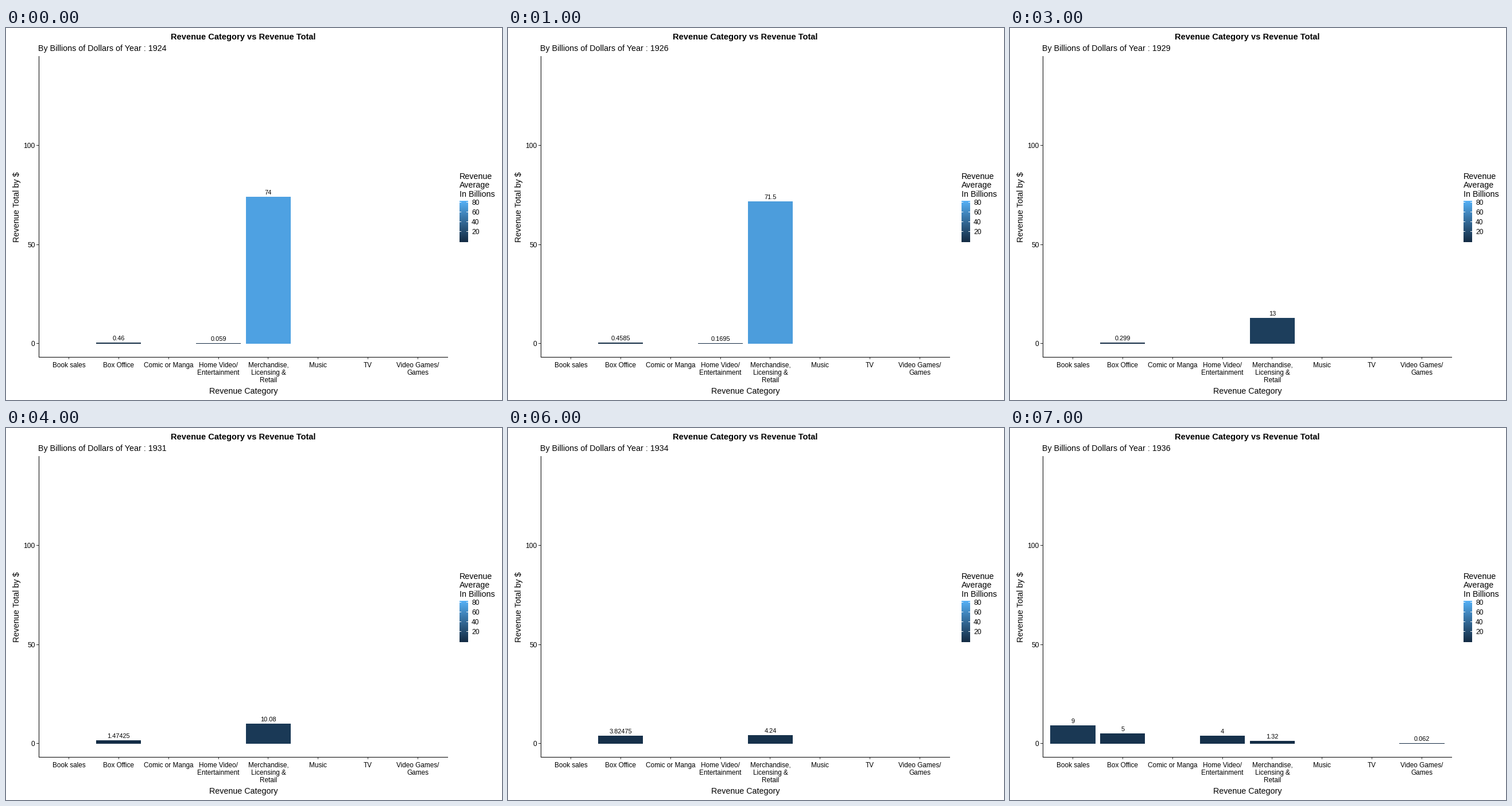
A matplotlib script for the animation above (8 s loop, 864x648 px).

```python
import numpy as np
import matplotlib.pyplot as plt
from matplotlib.animation import FuncAnimation
from matplotlib.patches import Rectangle

W, H, DPI = 864, 648, 100
FRAMES, INTERVAL = 8, 1000
LEFT, RIGHT, TOP, AXIS_Y = 57, 770, 49, 573
ZERO_Y, UNIT, BASE = 549.45, 3.455, 550
FIRST_X, STEP, BAR_W = 109.5, 86.87, 78.2
MAX_VALUE = 83

CATEGORIES = ["Book sales", "Box Office", "Comic or Manga",
              "Home Video/\nEntertainment", "Merchandise,\nLicensing &\nRetail",
              "Music", "TV", "Video Games/\nGames"]

# category index -> runs of (frames, values), linear between the keys
SERIES = {
    0: [([7], [9])],
    1: [([0, 2, 3, 7], [0.46, 0.457, 0.299, 5])],
    3: [([0, 2], [0.059, 0.28]), ([7], [4])],
    4: [([0, 2, 3, 7], [74, 69, 13, 1.32])],
    7: [([7], [0.062])],
}

RGB_XYZ = np.array([[0.4124, 0.3576, 0.1805],
                    [0.2126, 0.7152, 0.0722],
                    [0.0193, 0.1192, 0.9505]])
WHITE = RGB_XYZ.sum(axis=1)
XYZ_LAB = np.array([[0, 116, 0], [500, -500, 0], [0, 200, -200]])


def to_lab(hex_color):
    rgb = np.array([int(hex_color[i:i + 2], 16) for i in (1, 3, 5)]) / 255
    linear = np.where(rgb > 0.04045, ((rgb + 0.055) / 1.055) ** 2.4, rgb / 12.92)
    t = RGB_XYZ @ linear / WHITE
    f = np.where(t > 0.008856, np.cbrt(t), 7.787 * t + 16 / 116)
    return XYZ_LAB @ f - [16, 0, 0]


def to_rgb(lab):
    f = np.linalg.solve(XYZ_LAB, lab + [16, 0, 0])
    t = np.where(f > 0.2069, f ** 3, (f - 16 / 116) / 7.787)
    linear = np.clip(np.linalg.solve(RGB_XYZ, t * WHITE), 0, 1)
    rgb = np.where(linear > 0.0031308,
                   1.055 * linear ** (1 / 2.4) - 0.055, 12.92 * linear)
    return np.clip(rgb, 0, 1)


LOW, HIGH = to_lab("#132B43"), to_lab("#56B1F7")


def fill_color(value):
    return to_rgb(LOW + (HIGH - LOW) * value / MAX_VALUE)


plt.rcParams["font.family"] = "Liberation Sans"
fig = plt.figure(figsize=(W / DPI, H / DPI), dpi=DPI, facecolor="white")
ax = fig.add_axes([0, 0, 1, 1])
ax.set_xlim(0, W)
ax.set_ylim(H, 0)
ax.axis("off")


def box(x, y, w, h, color, z=2):
    return ax.add_patch(Rectangle((x, y), w, h, facecolor=color, linewidth=0,
                                  antialiased=False, zorder=z))


def label(x, y, text, px, ha="left", **kw):
    return ax.text(x, y, text, fontsize=px * 72 / DPI, ha=ha, va="baseline",
                   color="black", **kw)


def center_x(i):
    return FIRST_X + STEP * i


def draw_axes():
    box(LEFT, TOP, 1, AXIS_Y - TOP + 1, "black")
    box(LEFT, AXIS_Y, RIGHT - LEFT, 1, "black")
    for value in (0, 50, 100):
        y = round(ZERO_Y - UNIT * value)
        box(LEFT - 4, y, 4, 1, "#333333")
        label(50.5, y + 5, str(value), 12, "right")
    for i, name in enumerate(CATEGORIES):
        x = center_x(i)
        box(int(x), AXIS_Y + 1, 1, 3, "#333333")
        for row, line in enumerate(name.split("\n")):
            label(x, 591 + 13 * row, line, 11.8, "center")


def draw_titles():
    label(413, 20, "Revenue Category vs Revenue Total", 14.6, "center",
          weight="bold")
    label(413.5, 637, "Revenue Category", 14.3, "center")
    ax.text(23, 311.5, "Revenue Total by $", fontsize=14.3 * 72 / DPI,
            rotation=90, rotation_mode="anchor", ha="center", va="baseline")


def draw_legend():
    for row, line in enumerate(("Revenue", "Average", "In Billions")):
        label(789.5, 263 + 15.3 * row, line, 14.3)
    top, height = 301, 72
    for k in range(height):
        box(790, top + k, 15, 1, fill_color(MAX_VALUE * (1 - (k + 0.5) / height)))
    for k, value in enumerate((80, 60, 40, 20)):
        y = 303 + 17 * k
        box(790, y, 3, 1, "white", 3)
        box(802, y, 3, 1, "white", 3)
        label(811, y + 5, str(value), 12)


draw_axes()
draw_titles()
draw_legend()
subtitle = label(56.5, 40, "", 14.3)
bars = {i: box(0, 0, 0, 0, "black") for i in SERIES}
values = {i: label(center_x(i), 0, "", 11, "center") for i in SERIES}


def value_at(i, frame):
    for keys, points in SERIES[i]:
        if keys[0] <= frame <= keys[-1]:
            return float(np.interp(frame, keys, points))
    return None


def update(frame):
    year = round(1924 + 12 * frame / 7)
    subtitle.set_text(f"By Billions of Dollars of Year : {year}")
    for i, bar in bars.items():
        value = value_at(i, frame)
        shown = value is not None
        bar.set_visible(shown)
        values[i].set_visible(shown)
        if not shown:
            continue
        left = round(center_x(i) - BAR_W / 2)
        right = round(center_x(i) + BAR_W / 2)
        top = round(ZERO_Y - UNIT * value)
        bar.set_bounds(left, top, right - left, BASE - top)
        bar.set_facecolor(fill_color(value))
        values[i].set_text(f"{value:.6g}")
        values[i].set_y(top - 4)
    return [subtitle, *bars.values(), *values.values()]


anim = FuncAnimation(fig, update, frames=FRAMES, interval=INTERVAL,
                     repeat=True, repeat_delay=0, blit=False)
plt.show()
```
